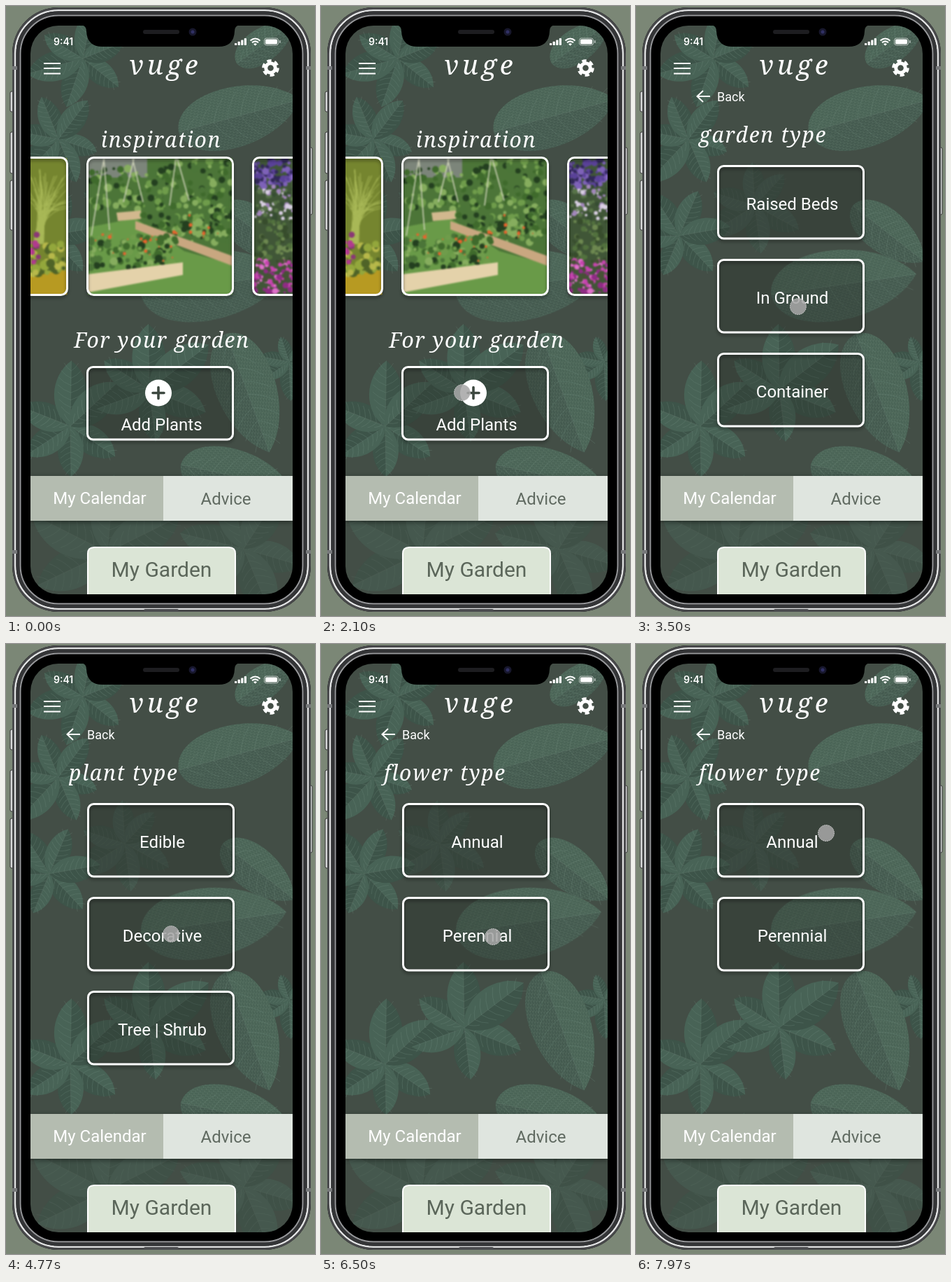
An HTML page for the animation above (8 s loop, 442x871 px).

```html
<!DOCTYPE html>
<html lang="en">
<head>
<meta charset="utf-8">
<title>Garden planner</title>
<style>
html, body { margin: 0; width: 100%; height: 100%; overflow: hidden; background: #7b8776; }
svg { display: block; width: 442px; height: 871px; }
text { font-family: Roboto, sans-serif; font-size: 24px; fill: #fff; }
.script { font: italic 300 30px "Noto Serif", serif; letter-spacing: 1.7px; }
.logo { font-size: 38px; letter-spacing: 5px; }
.mid { text-anchor: middle; }
.edge { fill: none; stroke: #fff; stroke-width: 3; filter: drop-shadow(0 3px 2px #0006); }
.line { fill: none; stroke: #fff; stroke-width: 2; }
.photo { filter: blur(.8px); }
</style>
</head>
<body>
<svg id="stage" viewBox="0 0 442 871"></svg>
<script>
let seed = 7;
const rand = () => (seed = seed * 16807 % 2147483647) / 2147483647;
const n1 = v => v.toFixed(1);
const rect = (x, y, w, h, r, attrs) =>
  `<rect x="${x}" y="${y}" width="${w}" height="${h}" rx="${r}" ${attrs}/>`;
const path = (d, attrs) => `<path d="${d}" ${attrs}/>`;
const circle = (x, y, r, attrs) => `<circle cx="${x}" cy="${y}" r="${r}" ${attrs}/>`;
const label = (x, y, str, cls = 'mid', style = '') =>
  `<text x="${x}" y="${y}" class="${cls}" style="${style}">${str}</text>`;
const repeat = (n, fn) => Array.from({ length: n }, (_, i) => fn(i)).join('');

// A leaf lies along its midrib; the two halves differ in shade.
function leaf(x, y, angle, len, broad) {
  const w = len * (broad ? .32 : .34), round = broad ? .03 : .2;
  const half = s => `M0 0C${n1(len * round)} ${n1(s * w)} ${n1(len * .75)} ${n1(s * w)} ${n1(len)} 0Z`;
  const veins = repeat(8, i => {
    const p = (i + .6) / 9, h = w * .6 * Math.sin(Math.PI * (p * .85 + .1));
    return [-1, 1].map(s =>
      `M${n1(len * p)} 0q${n1(len * .04)} ${n1(s * h * .6)} ${n1(len * .12)} ${n1(s * h)}`).join('');
  });
  const [light, dark] = broad ? ['#4a6456', '#445a4f'] : ['#486356', '#3d5449'];
  return `<g transform="translate(${x} ${y}) rotate(${n1(angle)})">` +
    path(half(-1), `fill="${light}"`) + path(half(1), `fill="${dark}"`) +
    (broad ? path(half(-1) + half(1), 'fill="url(#mesh)"') : '') +
    path(`M0 0H${n1(len)}` + veins, 'fill="none" stroke="#718c7f" stroke-width=".9" opacity=".3"') + '</g>';
}
const sprig = (x, y, size, turn) => repeat(6, i =>
  leaf(x, y, turn + i * 60 + rand() * 20, size * (.75 + rand() * .4)));

const foliage =
  `<g opacity=".5">${sprig(145, 780, 115, 20)}${sprig(340, 775, 100, 0)}${sprig(170, 285, 70, 10)}</g>` +
  sprig(110, 75, 75, 30) + sprig(75, 190, 75, 0) + sprig(62, 328, 72, 40) +
  sprig(92, 600, 85, 15) + sprig(205, 548, 95, 20) + sprig(405, 508, 50, 10) +
  leaf(247, 180, -15, 180, true) + leaf(330, 82, -35, 100, true) +
  leaf(310, 285, 38, 130, true) + leaf(193, 412, -8, 210, true) +
  leaf(315, 468, 70, 180, true) + leaf(250, 655, 12, 160, true);

// Loose dabs of colour filling a box.
const dabs = (x, y, w, h, count, size, ...colors) => repeat(count, i =>
  circle(n1(x + rand() * w), n1(y + rand() * h), n1(size * (.5 + rand())), `fill="${colors[i % colors.length]}"`));
const bed = (...area) => dabs(...area, 4, '#3f6a2c', '#6f9c4b', '#233f1f', '#86ad5e', '#4b7538');
const blooms = (...area) => dabs(...area, 1.8, '#e8632c');
const fill = (x, y, w, h, color) => rect(x, y, w, h, 0, `fill="${color}"`);

const bedsPhoto =
  fill(117, 217, 207, 196, '#4c7538') + fill(117, 217, 85, 28, '#7c857a') +
  bed(118, 232, 115, 60, 100) + bed(228, 218, 96, 110, 140) +
  path('M117 316L185 303 255 350 324 369V413H117Z', 'fill="#699a48"') +
  path('M158 295L193 292V304L160 307Z', 'fill="#d2b88e"') +
  bed(195, 297, 126, 42, 70) + blooms(205, 297, 110, 38, 16) +
  path('M185 307L324 357V371L185 319Z', 'fill="#c9a780"') +
  bed(120, 328, 124, 46, 100) + blooms(125, 325, 115, 42, 18) +
  path('M117 383L253 366V384L117 409Z', 'fill="#e4d2aa"') +
  path('M140 218L122 328M140 218L148 320M181 218L196 280M183 218L168 280M243 218L234 285M245 218L262 278',
    'fill="none" stroke="#d3d6bd" stroke-width="1.5"');
const blades = repeat(50, () =>
  `M${n1(38 + rand() * 16)} 340Q${n1(45 + rand() * 15)} 285 ${n1(30 + rand() * 65)} ${n1(232 + rand() * 60)}`);
const grassPhoto =
  fill(30, 217, 60, 196, '#75852f') +
  path(blades, 'fill="none" stroke="#a9b957" stroke-width="1"') +
  fill(30, 372, 60, 41, '#b79a22') +
  dabs(35, 340, 50, 42, 40, 5, '#93a73c', '#b7b84a', '#4f6327') +
  dabs(33, 322, 14, 48, 15, 3, '#b13a8e', '#8a3875');
const flowersPhoto =
  fill(354, 217, 60, 196, '#405637') +
  dabs(355, 218, 55, 40, 70, 3.5, '#5a4298', '#312858', '#7e62b8') +
  dabs(355, 257, 55, 48, 70, 3, '#d9cfe3', '#587448', '#a287bb', '#364d32') +
  dabs(355, 305, 55, 60, 60, 3, '#6d8850', '#374c2c', '#52713e') +
  dabs(355, 362, 55, 48, 90, 3, '#c544ad', '#8f2b84', '#df70ca', '#465135');

const photo = (x, art) =>
  `<svg x="${x}" y="216.5" width="208" height="196" viewBox="${x} 216.5 208 196"><g class="photo">${art}</g></svg>` +
  rect(x, 216.5, 208, 196, 9, 'class="edge"');
const box = (x, y) =>
  rect(x + 1.5, y + 1.5, 208, 103.5, 8, 'fill="#262d28" fill-opacity=".32"') +
  rect(x + 1.5, y + 1.5, 208, 103.5, 8, 'class="edge"');

const home =
  label(222, 202, 'inspiration', 'script mid') +
  photo(-120.5, grassPhoto) + photo(116.5, bedsPhoto) + photo(353.5, flowersPhoto) +
  label(223, 488, 'For your garden', 'script mid') +
  box(115, 514) +
  circle(218, 552.5, 19, 'fill="#fff"') +
  path('M210 552.5h16m-8-8v16', 'stroke="#3d4840" stroke-width="3.6" stroke-linecap="round"') +
  label(222.5, 606, 'Add Plants');

const picker = (title, ...names) =>
  path('M106 129H88m8-8l-8.5 8 8.5 8', 'class="line"') +
  label(116, 136, 'Back', '', 'font-size:18px') +
  label(90, 195, title, 'script') +
  names.map((name, i) => box(116, 227 + 134 * i) + label(223.5, 291 + 134 * i, name)).join('');

const pages = [
  home,
  picker('garden type', 'Raised Beds', 'In Ground', 'Container'),
  picker('plant type', 'Edible', 'Decorative', 'Tree | Shrub'),
  picker('flower type', 'Annual', 'Perennial')
];

const ring = (inset, color, width) =>
  rect(9 + inset, 2 + inset, 427 - 2 * inset, 863 - 2 * inset, 66 - inset,
    `fill="none" stroke="${color}" stroke-width="${width}"`);
const button = (x, y, h) => rect(x, y, 5, h, 2, 'fill="#d4d5d6" stroke="#333"');
const phone =
  button(6, 122, 29) + button(6, 180, 59) + button(6, 249, 71) + button(433, 202, 96) +
  rect(9, 2, 427, 863, 66, 'fill="#000"') +
  ring(1.5, '#47484a', 3) + ring(4.2, '#e2e3e4', 2.6) + ring(8, '#343537', 5) + ring(11.5, '#97989b', 2) +
  [9, 429].map(x => fill(x, 86, 7, 5, '#77797b') + fill(x, 777, 7, 5, '#77797b')).join('') +
  rect(197, 861, 50, 4, 2, 'fill="#4c4d50"');

const chrome =
  path('M107 27Q115 28 115 36Q116 58 138 58H304Q326 58 327 36Q327 28 335 27Z', 'fill="#000"') +
  rect(196, 34, 52, 6, 3, 'fill="#1d1d20"') +
  circle(267, 37, 5.5, 'fill="#17172c"') + circle(267, 37, 2.5, 'fill="#303063"') +
  label(68, 56, '9:41', '', 'font:600 14px Inter,sans-serif') +
  repeat(4, i => rect(327 + i * 4.6, 53 - i * 2.3, 3.2, 3 + i * 2.3, .7, 'fill="#fff"')) +
  path('M349.5 49.5q7-6 14 0M352 52.3q4.5-3.8 9 0', 'class="line"') +
  path('M354 54.2q2.5-2 5 0l-2.5 2.5z', 'fill="#fff"') +
  rect(369.5, 46, 20, 10, 3, 'fill="none" stroke="#fff9"') +
  rect(371, 47.5, 17, 7, 1.6, 'fill="#fff"') + rect(391, 49, 1.5, 4, .7, 'fill="#fffa"') +
  path('M54 82h24M54 89h24M54 96.5h24', 'class="line"') +
  label(228, 98, 'vuge', 'script logo mid') +
  circle(378.5, 88.5, 6.8, 'fill="none" stroke="#fff" stroke-width="5"') +
  circle(378.5, 88.5, 10.3, 'fill="none" stroke="#fff" stroke-width="4" stroke-dasharray="6.2 4.587"') +
  `<g style="filter:drop-shadow(0 2px 3px #0007)">${fill(35, 671, 190, 64, '#b4bcb0')}` +
  fill(225, 671, 185, 64, '#dfe5df') + '</g>' +
  label(134, 711, 'My Calendar') + label(314.5, 712, 'Advice', 'mid', 'fill:#606a61') +
  path('M117 842V782q0-9 9-9h193q9 0 9 9v60', 'fill="#dbe5d6" stroke="#fff" stroke-width="2"') +
  label(222.5, 815, 'My Garden', 'mid', 'font-size:30px;fill:#5b665a');

document.getElementById('stage').innerHTML = `
  <defs>
    <clipPath id="screen">${rect(35, 28, 375, 812, 40, '')}</clipPath>
    <pattern id="mesh" width="5" height="4" patternUnits="userSpaceOnUse" patternTransform="rotate(25)">
      <path d="M0 2q1.2-2 2.5 0t2.5 0M2.5 2v2" fill="none" stroke="#7b9a88" stroke-width=".7" opacity=".3"/>
    </pattern>
  </defs>
  ${phone}
  <g clip-path="url(#screen)">
    ${fill(35, 28, 375, 812, '#434e46')}${foliage}
    ${pages.map(p => `<g class="page">${p}</g>`).join('')}
    ${chrome}
  </g>
  ${circle(0, 0, 11.5, 'id="cursor" fill="#a6a6a6" fill-opacity=".87" stroke="#d2d2d2" stroke-width=".8" stroke-dasharray="2 1"')}`;

// Each move bends towards a point on its way to the next stop.
const start = [228, 855];
const moves = [
  { from: 500, until: 967, bend: [175, 700], to: [202, 589] },
  { from: 1233, until: 1433, bend: [202, 570], to: [202, 552] },
  { from: 2967, until: 3700, bend: [232, 429], to: [236, 412] },
  { from: 4700, until: 5300, bend: [231, 417], to: [333, 501] },
  { from: 5500, until: 5833, bend: [306, 424], to: [246, 418] },
  { from: 7233, until: 7967, bend: [360, 518], to: [272, 270] }
];
const changes = [2166, 4166, 6366];
const presses = [1966, 3966, 6366];
const tick = 200 / 3;
const views = document.querySelectorAll('.page');
const cursor = document.getElementById('cursor');

function place(t) {
  let spot = start;
  for (const { from, until, bend, to } of moves) {
    if (t < from) break;
    const u = Math.min(1, (t - from) / (until - from)), v = 1 - u;
    spot = spot.map((p, i) => v * v * p + 2 * u * v * bend[i] + u * u * to[i]);
  }
  return spot;
}

function draw(now) {
  // The picture advances fifteen times a second, half a tick off the start.
  const t = (Math.floor((now % 8000) / tick + .5) - .5) * tick + .5;
  const shown = changes.filter(c => t >= c).length;
  views.forEach((v, i) => v.style.display = i === shown ? '' : 'none');
  const [x, y] = place(t);
  cursor.setAttribute('transform', `translate(${n1(x)} ${n1(y)})`);
  cursor.setAttribute('r', presses.some(p => t >= p && t < p + 2 * tick) ? 10 : 11.5);
  cursor.style.display = t < 500 ? 'none' : '';
  requestAnimationFrame(draw);
}
requestAnimationFrame(draw);
</script>
</body>
</html>
```
